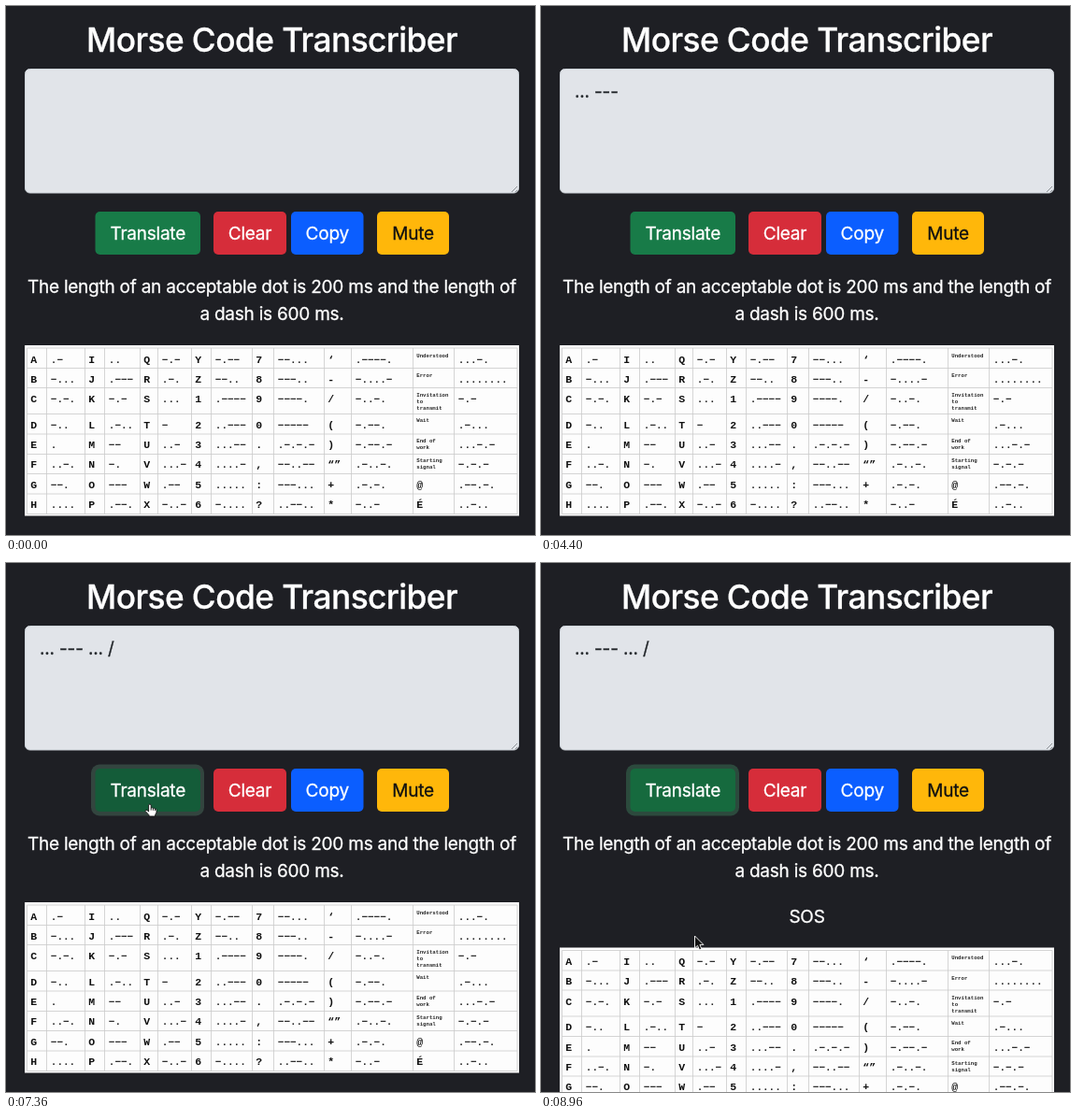
Animation of 566 by 566 pixels, one loop 9040 ms. Source, as an HTML page:

```html
<!DOCTYPE html>
<html lang="en">
<head>
<meta charset="utf-8">
<title>Morse Code Transcriber</title>
<style>
  html, body { margin: 0; width: 100%; height: 100%; overflow: hidden; background: #1e1f24; }
  svg { display: block; width: 100vw; height: 100vh; }
  text {
    font: 400 19px Inter, "Open Sans", sans-serif;
    font-optical-sizing: none;
    font-feature-settings: "calt" 0;
    letter-spacing: -.235px;
    color: #fff;
    fill: currentColor;
    stroke: currentColor;
    stroke-width: .3px;
    white-space: pre;
  }
  .mid { text-anchor: middle; }
  .title { font-size: 35.3px; font-weight: 500; letter-spacing: -.58px; }
  #typed { color: #212529; letter-spacing: -.18px; }
  #chart text {
    font: 700 11px "Liberation Mono", "DejaVu Sans Mono", monospace;
    letter-spacing: 0;
    color: #262626;
    stroke: none;
  }
  #chart .sign { font-size: 11.5px; color: #111; }
  #chart .label { font-size: 5.7px; }
</style>
</head>
<body>
<svg viewBox="0 0 566 566">
  <rect width="566" height="566" fill="#1e1f24"/>
  <text class="mid title" x="284.5" y="48.5">Morse Code Transcriber</text>

  <rect x="20.5" y="67.5" width="528" height="132.5" rx="5" fill="#e1e4e9" stroke="#ced4da"/>
  <path d="M541 199L547 193M545 199L547 197" stroke="#777b80" stroke-width=".8"/>
  <text id="typed" x="36" y="98"></text>

  <rect id="ring" x="91" y="215.5" width="121" height="55" rx="9"/>
  <g id="buttons"></g>

  <text class="mid" x="284.5" y="307">The length of an acceptable dot is 200 ms and the length of</text>
  <text class="mid" x="284.5" y="336">a dash is 600 ms.</text>
  <text class="mid" id="answer" x="284.5" y="385">SOS</text>
  <g id="chart"></g>

  <path id="arrow" d="M0 0V13L3 10.3L5 14.8L7.3 13.8L5.4 9.4H9.4Z"
        fill="#111" stroke="#fff" stroke-width=".9" stroke-linejoin="round"/>
  <path id="hand" d="M-1.4 .8Q0 -.8 1.2 .8V4.2Q2.5 3.3 3.4 4.6Q4.7 3.9 5.4 5.2Q7 4.7 7 6.5V9L5.6 11.5V13H-1V11.7L-4.9 7.4Q-4.8 5.6 -3 6.5L-1.4 8ZM1.2 4.2V6.6M3.4 4.6V6.8M5.4 5.2V7"
        fill="#fff" stroke="#111" stroke-width=".9" stroke-linejoin="round"/>
</svg>
<script>
const LOOP = 9040, STEP = 80;
const PRESS = 7360, RELEASE = 7440, FADE = 160;
const $ = id => document.getElementById(id);

function add(parent, tag, attrs, content = "") {
  const node = document.createElementNS("http://www.w3.org/2000/svg", tag);
  for (const name in attrs) node.setAttribute(name, attrs[name]);
  node.textContent = content;
  parent.append(node);
  return node;
}

// Each button has a resting colour and a darker one for hover and focus.
const buttons = [
  ["Translate", 95.5, 112.5, [24, 123, 72], [22, 106, 62]],
  ["Clear", 222, 78, [214, 45, 58], [184, 45, 57]],
  ["Copy", 305, 77.5, [11, 94, 255], [11, 82, 215]],
  ["Mute", 397, 77, [255, 183, 10], [255, 195, 44]]
].map(([label, x, width, rest, hover]) => {
  const box = add($("buttons"), "rect", { x, y: 220, width, height: 46, rx: 5 });
  const color = label === "Mute" ? "#111" : "#fff";
  add($("buttons"), "text", { class: "mid", x: x + width / 2, y: 250, style: `color:${color}` }, label);
  return { label, x, width, rest, hover, box };
});

// Reference chart: each column holds eight signs with their codes.
const columns = [
  ["A .-", "B -...", "C -.-.", "D -..", "E .", "F ..-.", "G --.", "H ...."],
  ["I ..", "J .---", "K -.-", "L .-..", "M --", "N -.", "O ---", "P .--."],
  ["Q -.-", "R .-.", "S ...", "T -", "U ..-", "V ...-", "W .--", "X -..-"],
  ["Y -.--", "Z --..", "1 .----", "2 ..---", "3 ...--", "4 ....-", "5 .....", "6 -...."],
  ["7 --...", "8 ---..", "9 ----.", "0 -----", ". .-.-.-", ", --..--", ": ---...", "? ..--.."],
  ["‘ .----.", "- -....-", "/ -..-.", "( -.--.", ") -.--.-", "“” .-..-.", "+ .-.-.", "* -..-"],
  ["Understood ...-.", "Error ........", "Invitation|to|transmit -.-", "Wait .-...",
   "End_of|work ...-.-", "Starting|signal -.-.-", "@ .--.-.", "É ..-.."]
];
const colLines = [22.5, 43.5, 84.5, 105.5, 143.5, 162.5, 198.5, 219.5, 263.5, 286.5, 340.5, 369.5, 435.5, 479.5, 547];
const rowLines = [366, 387.5, 408.5, 436.5, 458, 479.5, 500.5, 522, 543.5];
const baselines = [381.5, 402.5, 424, 451.5, 473, 494, 515.5, 537];

const chart = $("chart");
add(chart, "rect", { x: 20, y: 363, width: 529, height: 182.5, fill: "#fdfdfd" });
add(chart, "path", {
  d: colLines.map(x => `M${x} 366V543.5`).join("") + rowLines.map(y => `M22.5 ${y}H547`).join(""),
  stroke: "#cbcbcb", "stroke-width": .8
});
columns.forEach((column, c) => column.forEach((entry, r) => {
  const [sign, code] = entry.split(" ");
  const x = colLines[c * 2] + 3.8, y = baselines[r];
  if (sign.length > 2) {
    sign.replace("_", " ").split("|").forEach((line, i) =>
      add(chart, "text", { class: "label", x, y: rowLines[r] + 9.5 - (r > 2 ? 1 : 0) + i * 7 }, line));
  } else {
    add(chart, "text", { class: "sign", x, y }, sign);
  }
  add(chart, "text", { x: colLines[c * 2 + 1] + 4.3, y }, code.replaceAll("-", "−"));
}));

// Each letter keys in at a steady pace: first symbol, then the beat between symbols.
const letters = [["...", 1680, 240], ["---", 3040, 640], ["...", 4960, 240], ["/", 6960, 0]];

function typedText(t) {
  return letters
    .map(([code, start, beat]) => [...code].filter((_, i) => t >= start + i * beat).join(""))
    .filter(Boolean).join(" ");
}

// Pointer positions: time, x, y. It sweeps in, overshoots and comes back to the button.
const route = [
  [6320, -12, 200], [6720, 250, 258], [6880, 145, 263], [7200, 154, 258],
  [7680, 154, 258], [8080, 168, 431], [8160, 168, 431], [8880, 164.5, 399], [LOOP, 164.5, 399]
];

function pointerAt(t) {
  const i = route.findIndex(([end]) => t < end);
  if (i < 1) return null;
  const [t0, x0, y0] = route[i - 1], [t1, x1, y1] = route[i];
  const p = (t - t0) / (t1 - t0), ease = p * p * (3 - 2 * p);
  return [x0 + (x1 - x0) * ease, y0 + (y1 - y0) * ease];
}

const clamp = v => Math.min(1, Math.max(0, v));
const mix = (a, b, p) => a.map((v, i) => v + (b[i] - v) * p);
const rgb = color => `rgb(${color.map(Math.round)})`;
const show = (node, on) => node.setAttribute("visibility", on ? "visible" : "hidden");

function isOver({ x, width }, pointer) {
  return pointer && pointer[0] > x && pointer[0] < x + width && pointer[1] > 220 && pointer[1] < 266;
}

// Share of the fade time just past that the pointer spent on the button.
function hoverLevel(button, t) {
  const samples = [.25, .5, .75, 1].map(part => pointerAt(t - part * FADE));
  return samples.filter(pointer => isOver(button, pointer)).length / samples.length;
}

function draw(t) {
  $("typed").textContent = typedText(t);

  const pressed = t >= PRESS, answered = t >= RELEASE;
  const settle = clamp((t - RELEASE) / FADE);
  for (const button of buttons) {
    const fill = button.label === "Translate" && pressed
      ? mix([20, 92, 57], button.hover, settle)
      : mix(button.rest, button.hover, hoverLevel(button, t));
    button.box.setAttribute("fill", rgb(fill));
  }
  $("ring").setAttribute("fill", rgb(mix([51, 69, 63], [44, 74, 61], settle)));
  show($("ring"), pressed);
  show($("answer"), answered);
  chart.setAttribute("transform", `translate(0 ${answered ? 48.5 : 0})`);

  const pointer = pointerAt(t);
  const onButton = buttons.some(button => isOver(button, pointer));
  show($("hand"), onButton);
  show($("arrow"), pointer && !onButton);
  if (pointer) for (const id of ["hand", "arrow"]) $(id).setAttribute("transform", `translate(${pointer})`);
}

function tick() {
  const t = performance.now() % LOOP;
  draw(Math.floor(t / STEP) * STEP);
  requestAnimationFrame(tick);
}
tick();
</script>
</body>
</html>
```
